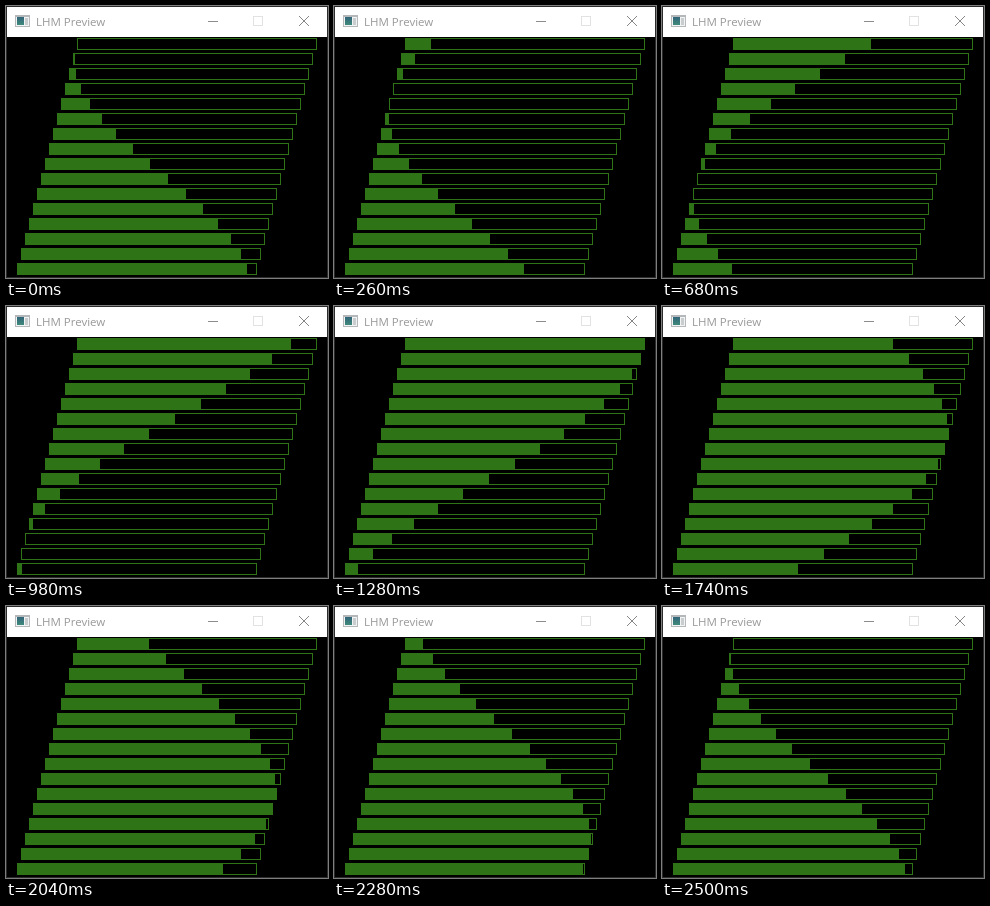
Write an HTML page with a canvas that moves like this. It is 322 px wide and 272 px high and loops after 2.52 s.

```html
<!DOCTYPE html>
<html lang="en">
<head>
<meta charset="utf-8">
<title>LHM Preview</title>
<style>
  html, body { margin: 0; width: 100%; height: 100%; overflow: hidden; background: #000; }
  canvas { display: block; }
</style>
</head>
<body>
<canvas id="stage" width="322" height="272"></canvas>
<script>
const ctx = document.getElementById('stage').getContext('2d');
const GREEN = '#2f7317';
const LOOP = 2520, TICK = 20;
const BARS = 16, BAR_W = 240, BAR_H = 12;
const TICK_PHASE = 0.05, BAR_PHASE = 0.184, START_PHASE = 0.025;

function box(x, y, w, h, color) {
  ctx.fillStyle = color;
  ctx.fillRect(x, y, w, h);
}

function outline(x, y, w, h, color) {
  ctx.strokeStyle = color;
  ctx.lineWidth = 1;
  ctx.strokeRect(x + 0.5, y + 0.5, w - 1, h - 1);
}

function drawIcon() {
  box(9, 9, 15, 12, '#b4b8ba');
  box(10, 11, 13, 9, '#f2f4f4');
  const panel = ctx.createLinearGradient(0, 11, 0, 19);
  panel.addColorStop(0, '#32657a');
  panel.addColorStop(1, '#3f8a7c');
  box(11, 11, 7, 8, panel);
  box(19, 12, 3, 7, '#c9cdd0');
}

function drawWindow() {
  box(0, 0, 322, 272, '#000');
  outline(0, 0, 322, 272, '#2b2b2b');
  box(1, 1, 320, 30, '#fff');
  drawIcon();

  ctx.font = '11.5px "Open Sans", "Noto Sans", sans-serif';
  ctx.fillStyle = '#999';
  ctx.fillText('LHM Preview', 30, 20);

  box(202, 15, 10, 1, '#8c8c8c');
  outline(247, 10, 10, 10, '#e2e2e2');
  ctx.strokeStyle = '#858585';
  ctx.beginPath();
  ctx.moveTo(293, 10);
  ctx.lineTo(303, 20);
  ctx.moveTo(303, 10);
  ctx.lineTo(293, 20);
  ctx.stroke();
}

function drawBars(tick) {
  for (let i = 0; i < BARS; i++) {
    const x = 71 - 4 * i, y = 32 + 15 * i;
    const phase = START_PHASE + tick * TICK_PHASE - i * BAR_PHASE;
    const level = (1 - Math.cos(phase)) / 2;
    outline(x, y, BAR_W, BAR_H, GREEN);
    box(x, y, Math.round(BAR_W * level), BAR_H, GREEN);
  }
}

const start = performance.now();

function render() {
  const time = Math.max(0, performance.now() - start) % LOOP;
  drawWindow();
  drawBars(Math.floor(time / TICK));
  requestAnimationFrame(render);
}

render();
</script>
</body>
</html>
```
